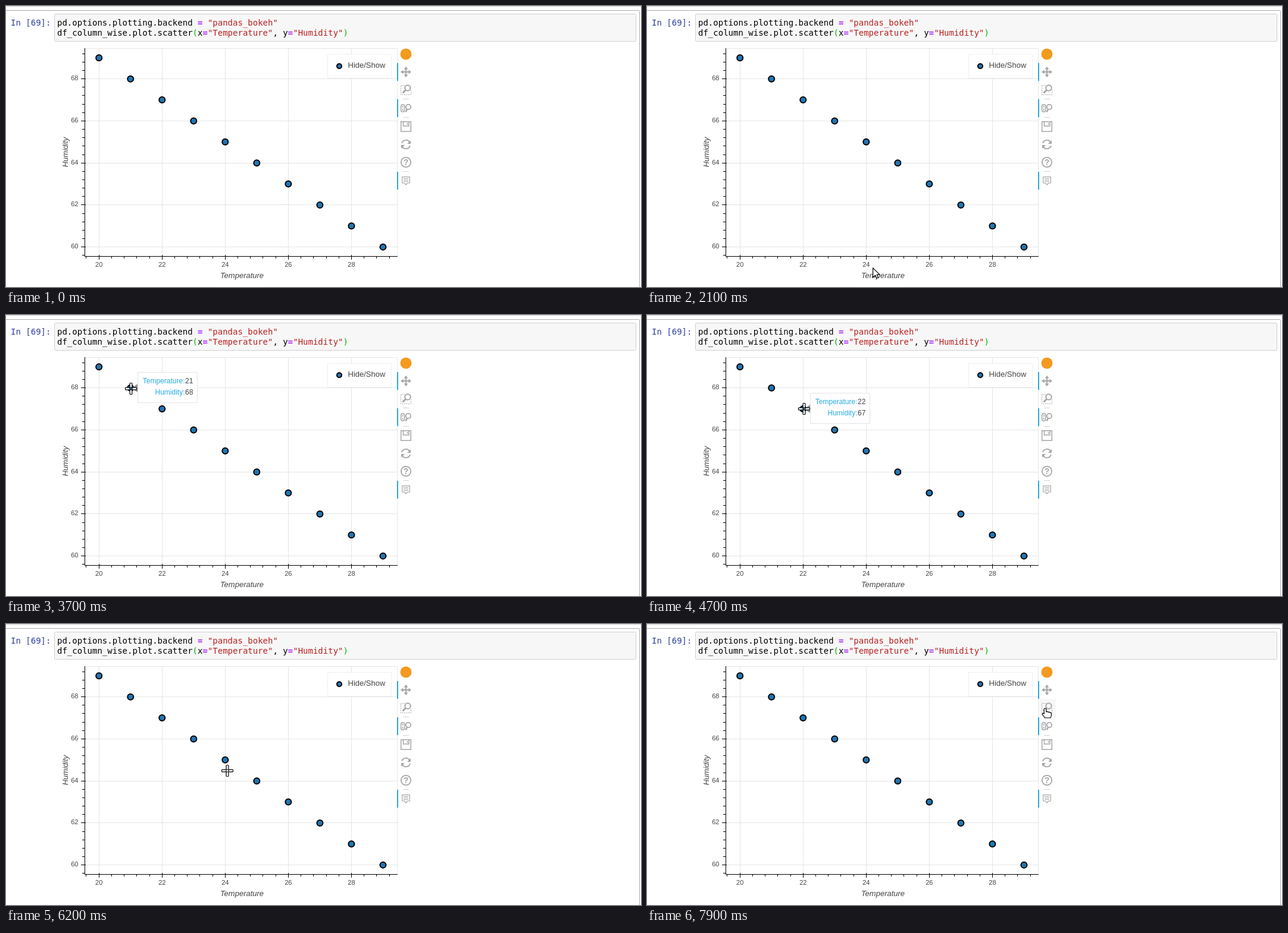
An HTML page for the animation above (8000 ms loop, 1067 px wide and 473 px high).

```html
<!DOCTYPE html>
<html lang="en">
<head>
<meta charset="utf-8">
<title>Scatter plot hover</title>
<style>
  html, body { margin: 0; width: 100%; height: 100%; overflow: hidden; background: #fff; }
  svg { display: block; font-family: "Liberation Sans", Arial, sans-serif; fill: #444; }
  .code { font: 14px "DejaVu Sans Mono", monospace; fill: #000; white-space: pre; }
  .prompt { fill: #303f9f; }
  .op { fill: #a2f; font-weight: bold; }
  .str { fill: #ba2121; }
  .match { fill: #0b0; }
  .tick { font-size: 11px; }
  .label { font-size: 13px; }
  .axis { font-size: 13px; font-style: italic; text-anchor: middle; }
  .grid { stroke: #e5e5e5; fill: none; }
  .ink { stroke: #000; fill: none; }
  .dot { stroke: #000; stroke-width: 2; fill: #1f77b4; }
  .icons { stroke: #a6a6a6; stroke-width: 1.5; fill: none; }
  .icons .solid { fill: #a6a6a6; stroke: none; }
  .tip { font-size: 12px; }
  .key { fill: #26aae1; text-anchor: end; }
  .cursor { fill: #fff; stroke: #000; stroke-width: 1.2; stroke-linejoin: round; }
</style>
</head>
<body>
<svg width="1067" height="473" viewBox="0 0 1067 473">
  <path d="M0 .5H1067" stroke="#ddd" stroke-width="2"/>
  <path d="M0 7.5H1063.5Q1064.5 7.5 1064.5 9V473" stroke="#ababab" fill="none"/>
  <rect x="81.5" y="13.5" width="977" height="46" rx="2" fill="#f7f7f7" stroke="#cfcfcf"/>
  <text class="code prompt" x="8" y="33">In [69]:</text>
  <text class="code" x="86" y="33">pd.options.plotting.backend <tspan class="op">=</tspan> <tspan class="str">"pandas_bokeh"</tspan></text>
  <text class="code" x="86" y="50">df_column_wise.plot.scatter<tspan class="match">(</tspan>x<tspan class="op">=</tspan><tspan class="str">"Temperature"</tspan>, y<tspan class="op">=</tspan><tspan class="str">"Humidity"</tspan><tspan class="match">)</tspan></text>

  <g id="plot"></g>
  <text class="axis" x="396.5" y="458">Temperature</text>
  <text class="axis" transform="translate(104 246) rotate(-90)">Humidity</text>
  <rect x="540.5" y="81.5" width="107" height="40" fill="#fff" fill-opacity=".95" stroke="#e5e5e5" stroke-opacity=".6"/>
  <circle class="dot" cx="560" cy="101.3" r="4"/>
  <text class="label" x="574.5" y="104">Hide/Show</text>

  <rect id="buttonHover" x="659" y="126" width="28" height="30" fill="#f7f7f7"/>
  <path d="M658 96V126M658 157V187M658 279V309" stroke="#26aae1" stroke-width="2"/>
  <path d="M667 156.5H677M667 187.5H677M667 278.5H677" stroke="#d3d3d3"/>
  <circle cx="672" cy="81" r="9.5" fill="#f39a1f"/>
  <g class="icons">
    <path d="M672 105V117M666 111H678" stroke-width="2"/>
    <path class="solid" d="M672 102l3.5 4.5h-7zM672 120l3.5-4.5h-7zM663 111l4.5-3.5v7zM681 111l-4.5-3.5v7z"/>
    <path d="M670 133.5H663.5V149.5H680.5V142" stroke-width="1" stroke-dasharray="2 1.5"/>
    <circle cx="675" cy="138" r="4.7" stroke-width="2"/>
    <path d="M671.5 141.5L666.5 146.5" stroke-width="3"/>
    <rect x="663.7" y="165.7" width="6" height="12.5" rx="3"/>
    <path d="M666.7 168V171M666.7 173V176"/>
    <circle cx="676" cy="170" r="4.2" stroke-width="1.8"/>
    <path d="M674 174L671.5 178.5" stroke-width="2.5"/>
    <path d="M663.7 194.7H680.3V211.3H663.7ZM667.5 195V202H677V195M674.5 197V200"/>
    <path d="M665 231A7.2 7.2 0 0 1 678 229M679 235A7.2 7.2 0 0 1 666 237" stroke-width="1.8"/>
    <path class="solid" d="M680 226v6h-6zM664 240v-6h6z"/>
    <circle cx="672" cy="263" r="8.2" stroke-width="1.8"/>
    <text class="solid" x="672" y="268" font-size="14" font-weight="bold" text-anchor="middle">?</text>
    <path d="M665.7 287.7H678.3V298H674.5L672 301L669.5 298H665.7ZM668 290.5H676M668 293H676M668 295.5H676" stroke-width="1.2"/>
  </g>

  <rect id="promptHover" x="-1" y="60.5" width="81.5" height="420" rx="2" fill="#f0f0f0" fill-opacity=".5" stroke="#777" stroke-opacity=".7"/>
  <g id="tip" class="tip">
    <path d="M2 0l10-7v14z" fill="#909599"/>
    <rect x="12.5" y="-26.5" width="100" height="51" fill="#fff" stroke="#e5e5e5"/>
    <text class="key" x="91.5" y="-8">Temperature:</text><text id="tipX" x="92" y="-8"></text>
    <text class="key" x="91.5" y="11">Humidity:</text><text id="tipY" x="92" y="11"></text>
  </g>
  <g id="cursor" class="cursor">
    <path id="arrow" d="M.6 .8V17L4.6 13.2 7 18.5 9.6 17.3 7.3 12.2H12Z"/>
    <g id="cross"></g>
    <path id="hand" d="M-1.8 9V1.6Q-1.8 0 0 0T1.8 1.6V6Q4 4.7 5 6.4 7 5.4 8 7.2 10.4 6.6 10.4 9V12Q10 14 9 16H-.5Q-2 13-4.6 10.6-5.3 8.6-3.6 8.3-2.6 8.3-1.8 9Z"/>
  </g>
</svg>
<script>
const LOOP = 8000, STEP = 100, HIT_RADIUS = 7;
const $ = id => document.getElementById(id);
const px = t => 156.2 + 53.03 * (t - 20);
const py = h => 87.3 + 35.37 * (69 - h);
const crisp = v => Math.floor(v) + .5;
const show = (id, on) => $(id).setAttribute("display", on ? "inline" : "none");
const points = Array.from({ length: 10 }, (_, i) => [20 + i, 69 - i]);

function drawPlot() {
  let grid = "M132 71.5H657.5V421", ticks = "M132.5 71V422M132 421.5H658", labels = "";
  for (let t = 20; t <= 28; t += 2) {
    const x = crisp(px(t));
    grid += `M${x} 71V421`;
    ticks += `M${x} 419V427`;
    labels += `<text class="tick" text-anchor="middle" x="${px(t)}" y="439">${t}</text>`;
  }
  for (let h = 60; h <= 68; h += 2) {
    const y = crisp(py(h));
    grid += `M132 ${y}H657`;
    ticks += `M126 ${y}H134`;
    labels += `<text class="tick" text-anchor="end" x="121.5" y="${py(h) + 2.5}">${h}</text>`;
  }
  for (let i = 0; i < 25; i++) {
    ticks += `M${crisp(px(19.6 + i * .4))} 421V425M128 ${crisp(py(59.6 + i * .4))}H132`;
  }
  const dots = points.map(([t, h]) => `<circle class="dot" cx="${px(t)}" cy="${py(h)}" r="5"/>`);
  $("plot").innerHTML = `<path class="grid" d="${grid}"/><path class="ink" d="${ticks}"/>` + labels + dots.join("");
}

// Pointer route: time, x, y
const route = [
  [400, 38, -12], [800, 62, 120], [1200, 80, 212], [1300, 82, 218], [1400, 86, 225],
  [1700, 180, 305], [2000, 345, 425], [2100, 379, 440], [2200, 403, 443],
  [2500, 310, 340], [2800, 165, 115], [2900, 151, 95], [3000, 155, 90],
  [3700, 210, 124], [3900, 210, 124], [4700, 264, 158], [4800, 264, 158],
  [5400, 315, 193], [5500, 315, 193], [5700, 374, 229], [6000, 371, 231], [6400, 372, 262],
  [6900, 468, 291], [7000, 464, 304], [7100, 477, 315], [7400, 477, 315],
  [7500, 487, 317], [7900, 669, 142]
];

function pointerAt(time) {
  const i = route.findIndex(stop => stop[0] >= time);
  if (i < 1) return route[0].slice(1);
  const [t0, x0, y0] = route[i - 1], [t1, x1, y1] = route[i];
  const k = (time - t0) / (t1 - t0);
  return [x0 + (x1 - x0) * k, y0 + (y1 - y0) * k].map(Math.round);
}

function render(time) {
  const [x, y] = pointerAt(time);
  const onPrompt = x < 81 && y >= 60;
  const onButton = x > 657 && y >= 126 && y < 156;
  const inPlot = x > 132 && x < 657 && y > 71 && y < 421;
  const hit = points.find(([t, h]) => Math.hypot(px(t) - x, py(h) - y) < HIT_RADIUS);

  show("cursor", time >= route[0][0]);
  show("arrow", !onPrompt && !onButton && !inPlot);
  show("cross", inPlot);
  show("hand", onPrompt || onButton);
  show("promptHover", onPrompt);
  show("buttonHover", onButton);
  show("tip", hit);
  $("cursor").setAttribute("transform", `translate(${x} ${y})`);
  if (hit) {
    $("tip").setAttribute("transform", `translate(${Math.round(px(hit[0]))} ${Math.round(py(hit[1]))})`);
    $("tipX").textContent = hit[0];
    $("tipY").textContent = hit[1];
  }
}

drawPlot();
$("cross").innerHTML = [0, 90, 180, 270].map(a =>
  `<rect x="-1.9" y="-9.5" width="3.8" height="7.5" rx="1" transform="rotate(${a})"/>`).join("");

const start = performance.now();
function tick(now) {
  const time = Math.max(0, now - start) % LOOP;
  render(Math.floor(time / STEP) * STEP);
  requestAnimationFrame(tick);
}
render(0);
requestAnimationFrame(tick);
</script>
</body>
</html>
```
